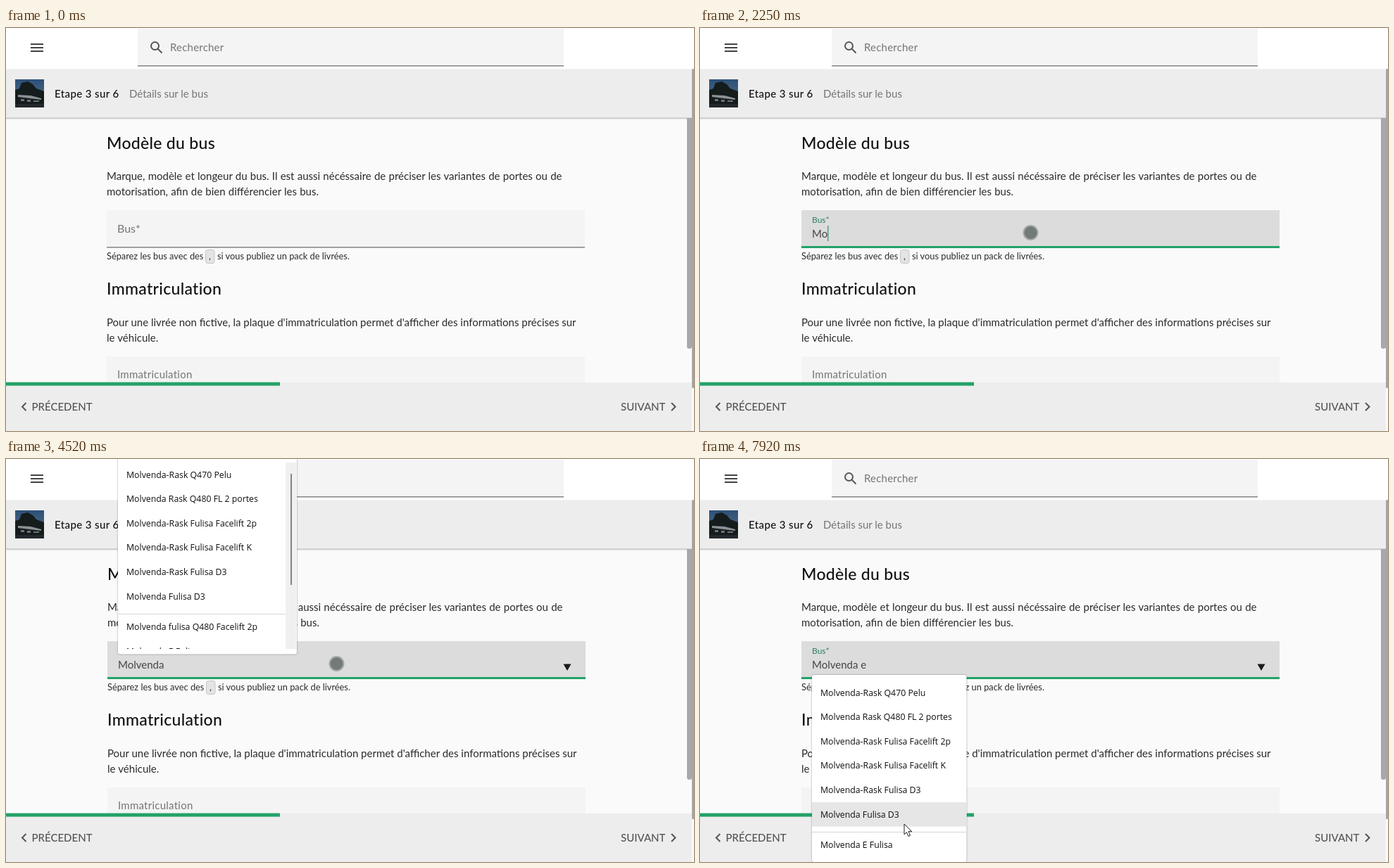
An HTML page for the animation above (7990 ms loop, 977 px wide and 573 px high).

```html
<!DOCTYPE html>
<html lang="fr">
<head>
<meta charset="utf-8">
<title>Détails sur le bus</title>
<style>
html, body { margin: 0; width: 100%; height: 100%; overflow: hidden; background: #fff; }
svg { display: block; }
text { font: 15px Lato, sans-serif; fill: #2b2b2b; white-space: pre; }
.body { word-spacing: .4px; }
.title { font-size: 23px; font-weight: 500; fill: #111; letter-spacing: .3px; }
.strong { font-weight: 500; fill: #111; }
.hint { fill: #757575; }
.small { font-size: 12.8px; }
.nav { font-weight: 500; fill: #555; }
.field { fill: #f4f4f4; }
.icon { fill: none; stroke: #555; stroke-width: 2; }
.green { fill: #23a268; }
.line { fill: #8a8a8a; }
.popup text { font: 12.3px "Open Sans", sans-serif; fill: #111; }
.frame { fill: #fff; filter: drop-shadow(0 .5px 1.2px rgba(0, 0, 0, .4)); }
</style>
</head>
<body>
<svg width="977" height="573" viewBox="0 0 977 573">
  <defs>
    <clipPath id="longClip"><rect id="longBox" x="155" y="-10"/></clipPath>
    <clipPath id="rowsClip"><rect x="159" y="-3" width="238" height="273"/></clipPath>
    <linearGradient id="sky" x2="0" y2="1">
      <stop offset="0" stop-color="#2c5078"/><stop offset=".6" stop-color="#48657f"/>
    </linearGradient>
  </defs>

  <rect y="58" width="977" height="515" fill="#fafafa"/>

  <g id="page">
    <text class="title" x="143" y="172">Modèle du bus</text>
    <text class="body" x="143" y="216">Marque, modèle et longeur du bus. Il est aussi nécéssaire de préciser les variantes de portes ou de</text>
    <text class="body" x="143" y="238">motorisation, afin de bien différencier les bus.</text>
    <rect id="field" class="field" x="143" y="259" width="679" height="53"/>
    <rect class="line" x="143" y="311" width="679" height="1.6"/>
    <rect id="focus" class="green" y="310" height="3"/>
    <text id="label" class="hint">Bus*</text>
    <text class="small" x="143" y="329">Séparez les bus avec des</text>
    <rect x="283.5" y="315.5" width="12.5" height="19" rx="3" fill="#e4e4e4" stroke="#c4c4c4"/>
    <text class="small" x="288" y="329">,</text>
    <text class="small" x="300" y="329">si vous publiez un pack de livrées.</text>
    <text class="title" x="143" y="379">Immatriculation</text>
    <text x="143" y="423.5">Pour une livrée non fictive, la plaque d'immatriculation permet d'afficher des informations précises sur</text>
    <text class="body" x="143" y="445.5">le véhicule.</text>
    <rect class="field" x="143" y="467" width="679" height="53"/>
    <text class="hint" x="158" y="498" letter-spacing=".25">Immatriculation</text>
  </g>
  <text id="typed" x="159" y="298" style="fill:#444"></text>
  <rect id="caret" y="281" width="1.2" height="22" fill="#2c8a72"/>
  <path id="tick" d="M791.5 291.5h11l-5.500 9.500z" fill="#1a1a1a"/>

  <rect width="977" height="58" fill="#fff"/>
  <path class="icon" d="M35 23h18M35 28h18M35 33h18" style="stroke:#444"/>
  <rect class="field" x="187" y="1" width="605" height="53"/>
  <rect class="line" x="187" y="53" width="605" height="1.600"/>
  <circle class="icon" cx="211.500" cy="25.500" r="5.500"/>
  <path class="icon" d="M215.500 29.500l6 6"/>
  <text class="hint" x="233" y="33" letter-spacing=".2">Rechercher</text>

  <rect y="58.500" width="974" height="70" fill="#ededed"/>
  <rect y="127.500" width="974" height="1.300" fill="#bdbdbd"/>
  <rect y="128.800" width="974" height="1.200" fill="#e8e8e8"/>
  <g transform="translate(13 73)">
    <rect width="41" height="40" fill="url(#sky)"/>
    <path d="M0 15l6-2 3-8 9-2 7 4 5 6 11 4v23H0z" fill="#141c1c"/>
    <path d="M4 22l18 1 15 4v2L4 25z" fill="#8b9094"/>
    <path d="M8 28h5v3H8zM17 29h5v3h-5zM26 30h8v2h-8z" fill="#6c7276"/>
    <path d="M0 35h41v5H0z" fill="#23282c"/>
  </g>
  <text class="strong" x="69" y="99" letter-spacing=".4">Etape 3 sur 6</text>
  <text class="hint" x="175" y="99">Détails sur le bus</text>

  <rect y="504" width="974" height="69" fill="#ededed"/>
  <rect x="974" y="58" width="3" height="515" fill="#fafafa"/>
  <rect x="974" y="58" width="4" height="454" rx="1.500" fill="#a6a6a6"/>
  <path d="M967 128h7v325q0 3-3.500 3t-3.500-3z" fill="#a8a8a8"/>
  <rect class="green" y="503.600" width="389" height="5"/>
  <path class="icon" d="M28.500 533l-5.500 5.500 5.500 5.500M945 533l5.500 5.500-5.500 5.500"/>
  <text class="nav" x="36.500" y="543.500">PRÉCEDENT</text>
  <text class="nav" x="873" y="543.500">SUIVANT</text>

  <g id="history" class="popup">
    <rect class="frame" x="158" y="307" width="184.500" height="222.500" rx="3"/>
  </g>
  <g id="long" class="popup"><g clip-path="url(#longClip)">
    <rect class="frame" x="159" y="-3" width="254" height="280.500" rx="3"/>
    <rect x="397" y="5" width="15.500" height="265" fill="#f0f0f0"/>
    <rect x="404" y="21" width="2" height="158" fill="#858585"/>
    <rect x="159" y="220" width="238" height="1" fill="#d6d6d6"/>
    <g id="longRows" clip-path="url(#rowsClip)"></g>
  </g></g>
  <g id="short" class="popup">
    <rect class="frame" x="159" y="307" width="219.500" height="266" rx="3"/>
    <rect id="hover" x="159" width="219.500" height="34.600" fill="#e6e6e6"/>
    <rect x="159" y="530" width="219.500" height="1" fill="#d6d6d6"/>
  </g>

  <g id="disc"><circle r="10" fill="#737b79" stroke="#a6a8a7" stroke-width="2"/></g>
  <path id="cross" fill="#000" stroke="#fff" stroke-width="1" paint-order="stroke"
    d="M0-7.500l3 3.500h-2v3h3v-2l3.500 3-3.500 3v-2h-3v3h2l-3 3.500-3-3.500h2v-3h-3v2l-3.500-3 3.500-3v2h3v-3h-2z"/>
  <path id="arrow" fill="#fff" stroke="#222" d="M0 0v15l3.400-3.300 2.500 5.800 2.600-1.100-2.500-5.700h4.800z"/>
</svg>

<script>
const LOOP = 7990, ROW = 34.6;
const TEXT = 'Molvenda e ';
const KEYS = [1910, 2180, 2380, 2580, 2720, 3600, 3730, 4060, 4920, 4990, 6460];
const $ = id => document.getElementById(id);
const set = (id, attrs) => { for (const k in attrs) $(id).setAttribute(k, attrs[k]); };
const show = (id, on) => { $(id).style.display = on ? '' : 'none'; };
const place = (id, x, y) => set(id, { transform: `translate(${x} ${y})` });
const within = (t, ...spans) => spans.some(([a, b]) => t >= a && t < b);
const mix = (a, b, k) => a + (b - a) * k;
const steps = (t, start, gap, n) => Math.max(0, Math.min(n, Math.floor((t - start) / gap) + 1)) / n;
const smooth = k => k * k * (3 - 2 * k);

function addRows(id, x, y, names, gapAfter = 99) {
  names.forEach((name, i) => {
    const row = document.createElementNS('http://www.w3.org/2000/svg', 'text');
    row.textContent = name;
    row.setAttribute('x', x);
    row.setAttribute('y', y + i * ROW + (i >= gapAfter ? 8.8 : 0));
    $(id).append(row);
  });
}

const models = ['Molvenda-Rask Q470 Pelu', 'Molvenda Rask Q480 FL 2 portes', 'Molvenda-Rask Fulisa Facelift 2p',
  'Molvenda-Rask Fulisa Facelift K', 'Molvenda-Rask Fulisa D3', 'Molvenda Fulisa D3'];
const electric = 'Molvenda E Fulisa';
addRows('history', 170, 336.5, ['Oltabus Prenavi', 'Tovrek Landvale KR16 4P', electric, 'fe', 'subtitle', 'fefefef']);
addRows('longRows', 171, 26.5, [...models, 'Molvenda fulisa Q480 Facelift 2p', electric], 6);
addRows('short', 171, 336.5, [...models, electric], 6);

function drawField(t) {
  const float = smooth(steps(t, 1050, 62, 3));
  const spread = smooth(steps(t, 1050, 62, 4));
  const typing = t >= 1910;
  place('page', typing ? 1 : 0, 0);
  $('field').style.fill = typing ? '#dcdcdc' : '';
  set('focus', { x: 482.5 - 339.5 * spread, width: 679 * spread });
  set('label', { x: 158, y: mix(291, 277, float) });
  $('label').style.fontSize = mix(16, 12, float) + 'px';
  $('label').style.fill = float > 0 ? '#2e7f63' : '';

  $('typed').textContent = TEXT.slice(0, KEYS.filter(k => k <= t).length);
  const x = 159 + (typing ? $('typed').getComputedTextLength() : 0);
  set('caret', { x });
  show('caret', within(t, [1112, 1640], [1910, 4520], [4920, 5650], [6130, 6920], [7380, 7860]));
  show('tick', t >= 2580);
}

function drawPopups(t) {
  const below = within(t, [2780, 2840], [3210, 3270]);
  show('history', within(t, [1298, 1980]));
  show('long', within(t, [2780, 4990]));
  show('short', t >= 5120);
  place('long', 0, below ? 310 : 0);
  set('longBox', below ? { width: 250, height: 201 } : { width: 264, height: 294 });
}

function drawPointer(t) {
  let x = 469.5, y = 291, kind = 'disc';
  if (t < 380) kind = '';
  else if (t < 790) {
    const k = Math.floor((t - 380) / 68.4) / 5;
    x = mix(867, 484, 1 - (1 - k) ** 2);
    y = mix(545, 257, 1 - (1 - k) ** 2);
    kind = 'arrow';
  } else if (within(t, [1710, 2050])) kind = 'cross';
  else if (t >= 7450) {
    const k = smooth(steps(t, 7450, 67, 8));
    x = mix(469.5, 290, k);
    y = mix(291, 519, k);
    if (y > 312) kind = 'arrow';
  }
  for (const id of ['disc', 'cross', 'arrow']) show(id, id === kind);
  if (kind) place(kind, x, y);

  const over = t >= 7450 && x < 378 && y > 315;
  show('hover', over);
  if (over) set('hover', { y: 315 + Math.floor((y - 315) / ROW) * ROW });
}

const start = performance.now();
function tick() {
  const t = (performance.now() - start) % LOOP;
  drawField(t);
  drawPopups(t);
  drawPointer(t);
  requestAnimationFrame(tick);
}
tick();
</script>
</body>
</html>
```
